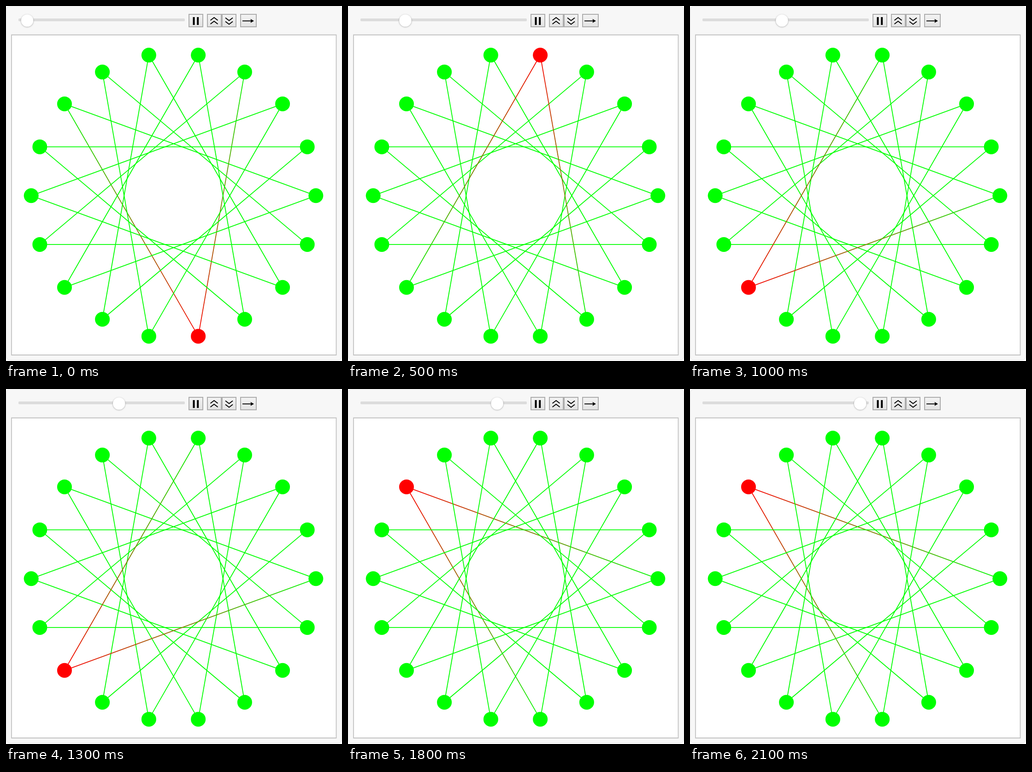
Write an HTML page with a canvas that moves like this. It is 729 px wide and 768 px high and loops after 2200 ms.

```html
<!DOCTYPE html>
<html>
<head>
<meta charset="utf-8">
<style>
html, body { margin: 0; width: 729px; height: 768px; overflow: hidden; background: #fff; }
canvas { display: block; }
</style>
</head>
<body>
<canvas id="stage" width="729" height="768"></canvas>
<script>
const c = document.getElementById('stage').getContext('2d');
const COUNT = 18, SKIP = 7, TICK = 100, LAST_STEP = 99;
const GREEN = '#00ff00', RED = '#ff0000';
// Place of the walker along the star path at each tick
const walk = [2, 1, -1, -2, -1, -2, -4, -3, 0, 0, -1, 0, -1, -1, -2, -1, 1, 2, 1, 4, 4, 1];

const node = k => {
  const a = k * SKIP * 2 * Math.PI / COUNT;
  return [363.5 + 308.8 * Math.cos(a), 410.3 - 308.8 * Math.sin(a)];
};

function path(points, color, width) {
  c.beginPath();
  points.forEach(p => c.lineTo(...p));
  c.strokeStyle = color;
  c.lineWidth = width;
  c.stroke();
}

function disc(x, y, r, color) {
  c.beginPath();
  c.arc(x, y, r, 0, 2 * Math.PI);
  c.fillStyle = color;
  c.fill();
}

function box(x, y, w, h, r, fill, stroke, width) {
  c.beginPath();
  c.roundRect(x, y, w, h, r);
  c.fillStyle = fill;
  c.fill();
  if (!stroke) return;
  c.strokeStyle = stroke;
  c.lineWidth = width;
  c.stroke();
}

function button(x, w) {
  const g = c.createLinearGradient(0, 17, 0, 46);
  g.addColorStop(0, '#f4f4f4');
  g.addColorStop(1, '#e2e2e2');
  box(x + 1, 18, w - 2, 27, 0, g, '#adadad', 2);
}

function chevron(x, y, dy) {
  path([[x - 8, y], [x, y + dy], [x + 8, y]], '#000', 1.9);
}

function controls(knob) {
  box(0.5, 0.5, 728, 765.5, 8, '#f7f7f7', '#e6e6e6', 1);
  box(12, 62.5, 704.5, 692.5, 0, '#fff', '#c2c2c2', 1.8);
  box(27, 27, 361, 6, 2, '#dcdcdc');

  c.save();
  c.shadowColor = 'rgba(0,0,0,.35)';
  c.shadowBlur = 3;
  c.shadowOffsetY = 0.7;
  disc(knob, 31.5, 13.3, '#fff');
  c.restore();

  button(396, 32);
  button(436, 32);
  button(468, 32);
  button(508, 36);
  c.fillStyle = '#000';
  c.fillRect(405.5, 24, 4, 17);
  c.fillRect(414.2, 24, 4, 17);
  for (const y of [0, 8]) {
    chevron(451.5, 31 + y, -6);
    chevron(484, 25.5 + y, 6);
  }
  path([[513, 32.3], [533, 32.3]], '#000', 1.9);
  c.beginPath();
  c.moveTo(538, 32.3);
  c.lineTo(530.5, 28);
  c.lineTo(531.5, 32.3);
  c.lineTo(530.5, 36.6);
  c.fill();
}

function star(active) {
  for (let k = 0; k < COUNT; k++) {
    const a = node(k), b = node(k + 1);
    const g = c.createLinearGradient(...a, ...b);
    g.addColorStop(0, k === active ? RED : GREEN);
    g.addColorStop(1, (k + 1) % COUNT === active ? RED : GREEN);
    path([a, b], g, 1.8);
  }
  for (let k = 0; k < COUNT; k++) disc(...node(k), 16, k === active ? RED : GREEN);
}

function draw() {
  const i = Math.floor(performance.now() / TICK) % walk.length;
  const step = Math.round(LAST_STEP * i / (walk.length - 1));
  c.clearRect(0, 0, 729, 768);
  controls(46 + 323.3 * step / LAST_STEP);
  star((walk[i] + COUNT) % COUNT);
  requestAnimationFrame(draw);
}
draw();
</script>
</body>
</html>
```
